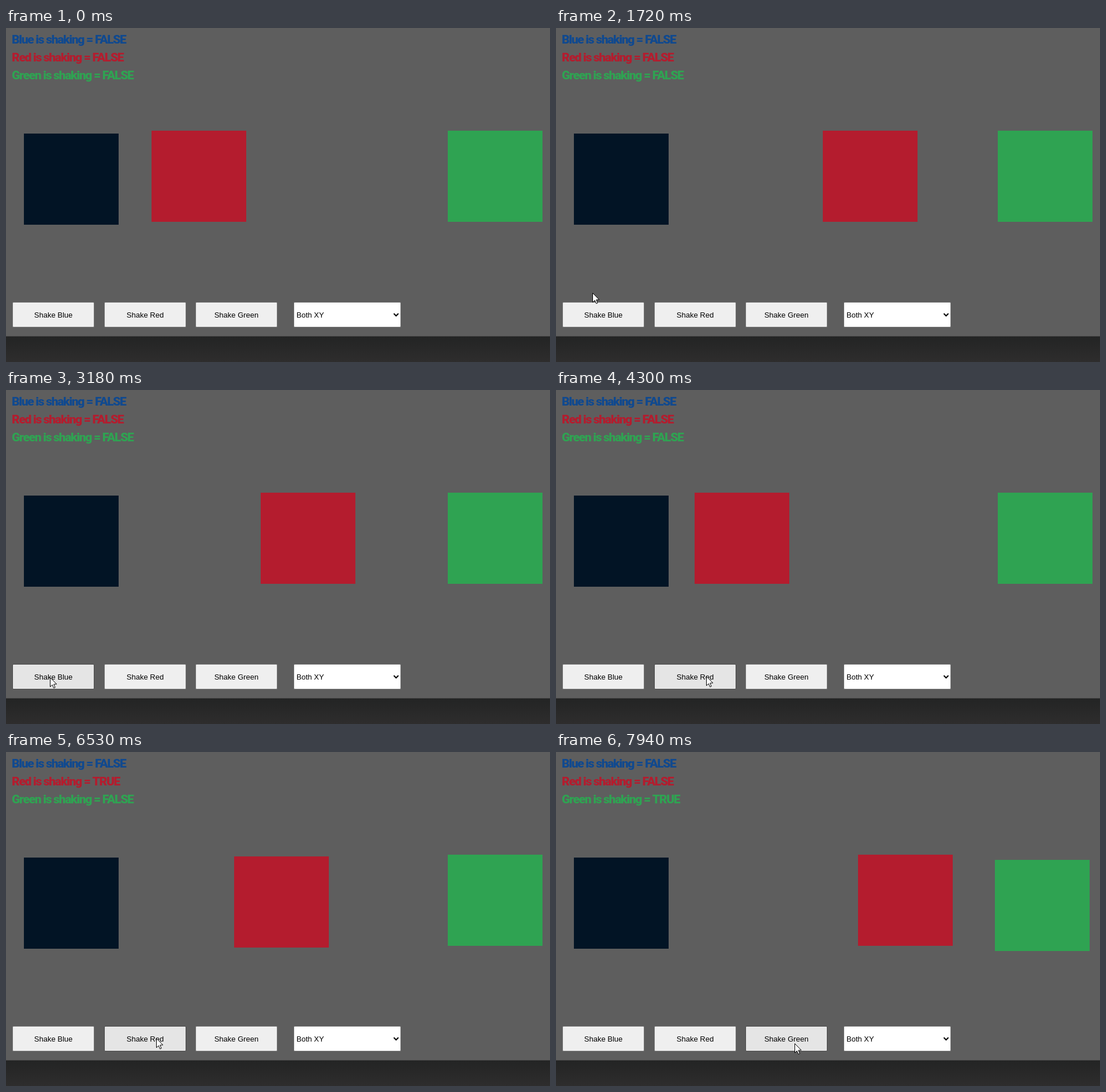
Write an HTML page with a canvas that moves like this. It is 942 px wide and 579 px high and loops after 8000 ms.

```html
<!DOCTYPE html>
<html lang="en">
<head>
<meta charset="utf-8">
<title>Shaking boxes</title>
<style>
  html, body { margin: 0; width: 100%; height: 100%; overflow: hidden; background: #5e5e5e; }
  canvas { display: block; }
</style>
</head>
<body>
<canvas id="stage" width="942" height="579"></canvas>
<script>
const ctx = document.getElementById('stage').getContext('2d');
const LOOP = 8000;
const STEP_MS = 69.79;      // the picture advances in steps; all times below count steps
const SHAKE_STEPS = 7.75;
const PRESS_STEPS = 1.4;
const LABEL_FONT = '13px "Liberation Sans", Arial, sans-serif';

// clicks: the steps at which each box starts to shake
const boxes = [
  { name: 'Blue',  x: 31,  y: 183, fill: '#021425', ink: '#10498f', clicks: [29.2, 49.9] },
  { name: 'Red',   x: 384, y: 178, fill: '#b41c2e', ink: '#b41c2e', clicks: [65.2, 88.2] },
  { name: 'Green', x: 765, y: 178, fill: '#2fa352', ink: '#2fa352', clicks: [111.4] }
];

// The pointer glides between stops along a parabola raised by lift.
const ENTRY = { x: 631, y: 362, step: 12 };
const glides = [
  { start: 12, end: 25,  x: 63,  y: 459, lift: 374 },
  { start: 25, end: 29,  x: 76,  y: 498, lift: -30 },
  { start: 57, end: 61,  x: 260, y: 496, lift: 0 },
  { start: 97, end: 106, x: 413, y: 505, lift: -13 }
];

const clamp01 = v => Math.min(1, Math.max(0, v));
const sinDeg = degrees => Math.sin(degrees * Math.PI / 180);

function pointerAt(step) {
  let { x, y } = ENTRY;
  for (const g of glides) {
    const p = clamp01((step - g.start) / (g.end - g.start));
    x += (g.x - x) * p;
    y += (g.y - y) * p - g.lift * 4 * p * (1 - p);
    if (p < 1) break;
  }
  return { x: Math.round(x), y: Math.round(y) };
}

// The red box sweeps 6 degrees per step and stands still while it shakes.
function sweep(box, step) {
  const frozen = box.clicks.reduce((sum, c) => sum + clamp01((step - c) / SHAKE_STEPS) * SHAKE_STEPS, 0);
  return 150 * sinDeg(6 * (step - frozen) - 118.5);
}

function text(str, x, y, font, color, align = 'left', spacing = '0px') {
  ctx.font = font;
  ctx.fillStyle = color;
  ctx.textAlign = align;
  ctx.letterSpacing = spacing;
  ctx.fillText(str, x, y);
}

function control(x, width, fill, border) {
  ctx.beginPath();
  ctx.roundRect(x + 0.5, 475.5, width - 1, 43, 1.5);
  ctx.fillStyle = fill;
  ctx.strokeStyle = border;
  ctx.lineWidth = 1;
  ctx.fill();
  ctx.stroke();
}

function drawBackground() {
  ctx.fillStyle = '#5e5e5e';
  ctx.fillRect(0, 0, 942, 535);
  const floor = ctx.createLinearGradient(0, 534, 0, 579);
  floor.addColorStop(0, '#232424');
  floor.addColorStop(1, '#2e2d2d');
  ctx.fillStyle = floor;
  ctx.fillRect(0, 534.5, 942, 45);
}

function drawBox(box, row, step) {
  const shaking = box.clicks.some(c => step >= c && step < c + SHAKE_STEPS);
  let { x, y } = box;
  if (box.name === 'Red') x += sweep(box, step);
  if (shaking) {
    x += 10 * sinDeg(124.5 * step + 177);
    y += 10 * sinDeg(146.3 * step + 305.3);
  }
  ctx.fillStyle = box.fill;
  ctx.fillRect(Math.round(x), Math.round(y), 164, 158);
  text(`${box.name} is shaking = ${shaking ? 'TRUE' : 'FALSE'}`, 10, 27 + row * 31,
    '900 21px Roboto, sans-serif', box.ink, 'left', '-1.3px');
}

function drawButton(box, column, step, pointer) {
  const x = Math.round(11 + column * 158.6);
  const over = pointer.x >= x && pointer.x < x + 142 && pointer.y >= 475 && pointer.y < 519;
  const pressed = box.clicks.some(c => step < c && step >= c - PRESS_STEPS);
  const [fill, border] = pressed ? ['#f5f5f5', '#8d8d8d']
    : over ? ['#e5e5e5', '#4a4a4a'] : ['#efefef', '#767676'];
  control(x, 142, fill, border);
  text('Shake ' + box.name, x + 71, 502, LABEL_FONT, '#000', 'center');
}

function drawSelect() {
  control(498, 186, '#fff', '#767676');
  text('Both XY', 503, 502, LABEL_FONT, '#000');
  ctx.strokeStyle = '#000';
  ctx.lineWidth = 2;
  ctx.stroke(new Path2D('M671.5 495l4 4 4-4'));
}

function drawPointer({ x, y }) {
  const arrow = new Path2D('M0 0v16l3.7-3.4 2.5 5.6 2.4-1-2.4-5.6 5-.2z');
  ctx.save();
  ctx.translate(x + 0.5, y + 0.5);
  ctx.fillStyle = '#fff';
  ctx.strokeStyle = '#000';
  ctx.lineWidth = 1;
  ctx.fill(arrow);
  ctx.stroke(arrow);
  ctx.restore();
}

function draw(now) {
  const step = Math.floor((now % LOOP + 37) / STEP_MS);
  const pointer = pointerAt(step);
  drawBackground();
  boxes.forEach((box, i) => drawBox(box, i, step));
  boxes.forEach((box, i) => drawButton(box, i, step, pointer));
  drawSelect();
  if (step >= ENTRY.step) drawPointer(pointer);
}

const begin = performance.now();
function tick() {
  draw(performance.now() - begin);
  requestAnimationFrame(tick);
}
tick();
</script>
</body>
</html>
```
